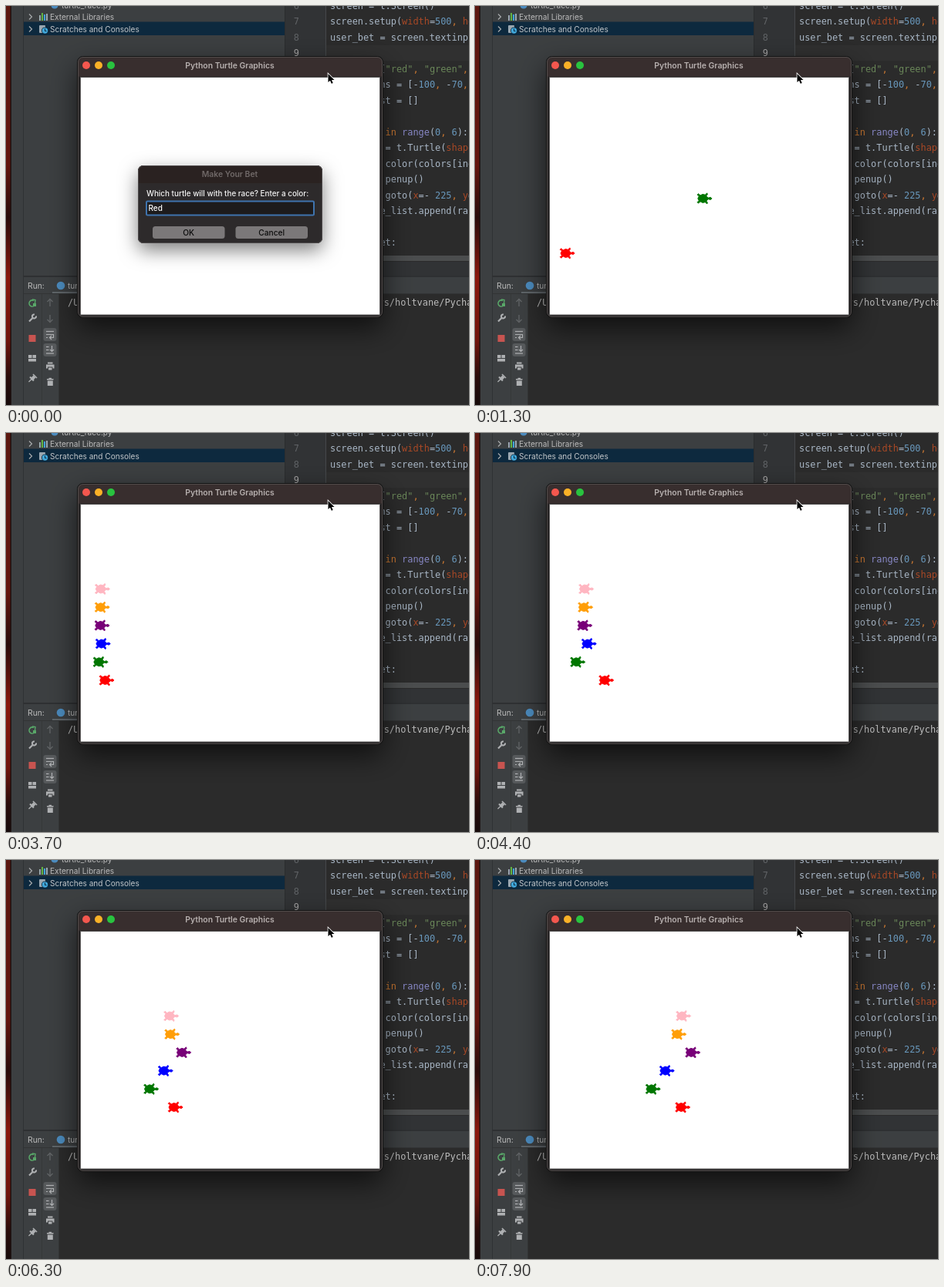
Write an HTML page with a canvas that moves like this. It is 600 px wide and 518 px high and loops after 8 s.

```html
<!DOCTYPE html>
<html lang="en">
<head>
<meta charset="utf-8">
<title>Turtle race</title>
<style>
  html, body { margin: 0; width: 100%; height: 100%; overflow: hidden; background: #2b2b2b; }
  canvas { display: block; width: 600px; height: 518px; }
</style>
</head>
<body>
<canvas id="stage"></canvas>
<script>
const W = 600, H = 518, LOOP = 8000, STEP = 100;
const canvas = document.getElementById('stage');
const ctx = canvas.getContext('2d');
const dpr = window.devicePixelRatio || 1;
canvas.width = W * dpr;
canvas.height = H * dpr;
ctx.scale(dpr, dpr);

const UI = 'Inter, "Liberation Sans", sans-serif';
const MONO = '11.9px "DejaVu Sans Mono", monospace';
const CHAR = 7.16;

function rect(x, y, w, h, color) {
  ctx.fillStyle = color;
  ctx.fillRect(x, y, w, h);
}

function round(x, y, w, h, r, color) {
  ctx.fillStyle = color;
  ctx.beginPath();
  ctx.roundRect(x, y, w, h, r);
  ctx.fill();
}

function outline(x, y, w, h, r, color, width = 1) {
  ctx.strokeStyle = color;
  ctx.lineWidth = width;
  ctx.beginPath();
  ctx.roundRect(x, y, w, h, r);
  ctx.stroke();
}

function disc(x, y, r, color) {
  ctx.fillStyle = color;
  ctx.beginPath();
  ctx.arc(x, y, r, 0, Math.PI * 2);
  ctx.fill();
}

function line(color, width, ...pts) {
  ctx.strokeStyle = color;
  ctx.lineWidth = width;
  ctx.beginPath();
  for (let i = 0; i < pts.length; i += 2) ctx.lineTo(pts[i], pts[i + 1]);
  ctx.stroke();
}

function text(str, x, y, color, font, align = 'left') {
  ctx.font = font;
  ctx.fillStyle = color;
  ctx.textAlign = align;
  ctx.fillText(str, x, y);
}

const ui = (size, weight = 400) => `${weight} ${size}px ${UI}`;

function withShadow(blur, dy, alpha, draw) {
  ctx.save();
  ctx.shadowColor = `rgba(0,0,0,${alpha})`;
  ctx.shadowBlur = blur * dpr;
  ctx.shadowOffsetY = dy * dpr;
  draw();
  ctx.restore();
}

// Code colours: d default, k keyword, s string, n number, a argument, b builtin
const INK = { d: '#a9b7c6', k: '#cc7832', s: '#6a8759', n: '#6897bb', a: '#aa4926', b: '#8888c6' };
const CODE = {
  6: ['d', 'screen = t.Screen()'],
  7: ['d', 'screen.setup(', 'a', 'width', 'd', '=', 'n', '500', 'k', ', ', 'a', 'height'],
  8: ['d', 'user_bet = screen.textinput'],
  10: ['d', 'colors = [', 's', '"red"', 'k', ', ', 's', '"green"', 'k', ','],
  11: ['d', 'y_positions = [-', 'n', '100', 'k', ', ', 'd', '-', 'n', '70', 'k', ','],
  12: ['d', 'turtle_list = []'],
  14: ['k', 'for ', 'd', 'index ', 'k', 'in ', 'b', 'range', 'd', '(', 'n', '0', 'k', ', ', 'n', '6', 'd', '):'],
  15: ['d', '    racer = t.Turtle(', 'a', 'shape', 'd', '='],
  16: ['d', '    racer.color(colors[index'],
  17: ['d', '    racer.penup()'],
  18: ['d', '    racer.goto(', 'a', 'x', 'd', '=- ', 'n', '225', 'k', ', ', 'a', 'y', 'd', '='],
  19: ['d', '    turtle_list.append(racer'],
  21: ['k', 'if ', 'd', 'user_bet:']
};

function editor() {
  rect(361, 0, 239, 351, '#2b2b2b');
  rect(361, 0, 54, 332, '#313335');
  rect(361, 0, 1, 351, '#2b2d2e');
  rect(414, 0, 1, 332, '#45484a');
  rect(415, 51, 185, 20, '#303030');
  for (const n in CODE) {
    let x = 420;
    const parts = CODE[n];
    for (let i = 0; i < parts.length; i += 2) {
      text(parts[i + 1], x, 24 + (n - 7) * 20.5, INK[parts[i]], MONO);
      x += parts[i + 1].length * CHAR;
    }
  }
  for (let n = 6; n < 10; n++) {
    text(n, 380, 24 + (n - 7) * 20.5, n === 9 ? '#a4a3a3' : '#606366', MONO, 'right');
  }
  rect(415, 324, 185, 7, '#4b4d4e');
  rect(361, 332, 239, 19, '#313335');
}

function projectTree() {
  rect(7, 0, 354, 518, '#3c3f41');
  rect(22, 0, 1, 518, '#2f3133');
  rect(23, 20.5, 338, 17.5, '#0d293e');
  const font = ui(10.1);
  text('turtle_race.py', 72, 3, '#bbbbbb', font);
  disc(63, -1, 4.5, '#4b8bbe');
  text('External Libraries', 57, 18, '#bbbbbb', font);
  text('Scratches and Consoles', 57, 34, '#c2c6c9', font);
  for (const y of [14, 30]) line('#a8abad', 1.2, 30, y - 3.5, 33.5, y, 30, y + 3.5);
  rect(43, 12, 2, 7, '#9aa7b0');
  rect(46, 9, 2, 10, '#62b543');
  rect(49, 11, 2, 8, '#40a6d8');
  rect(52, 10, 2, 9, '#9aa7b0');
  round(43, 25, 8, 10, 1, '#9aa7b0');
  disc(50.5, 32, 4.5, '#0d293e');
  disc(50.5, 32, 3.7, '#40a6d8');
  line('#0d293e', 1, 50.5, 29.5, 50.5, 32.5, 52.5, 32.5);
}

function wallpaper() {
  const g = ctx.createLinearGradient(0, 0, 0, H);
  g.addColorStop(0, '#5c170f');
  g.addColorStop(0.4, '#64150d');
  g.addColorStop(0.53, '#2a0c0a');
  g.addColorStop(0.68, '#8a180c');
  g.addColorStop(0.84, '#70140b');
  g.addColorStop(0.93, '#2a0c0a');
  g.addColorStop(1, '#160a0a');
  rect(0, 0, 7, H, g);
  rect(5.5, 0, 1.5, H, '#1d1312');
}

function toolIcons() {
  const c = '#afb1b3', dim = '#626567';
  // rerun
  ctx.strokeStyle = '#59a869';
  ctx.lineWidth = 1.5;
  ctx.beginPath();
  ctx.arc(34, 386, 4, 0.6, 5.2);
  ctx.stroke();
  line('#59a869', 1.4, 34, 381, 38, 381.5, 37.5, 386);
  rect(35, 386, 4, 4, '#59a869');
  // wrench
  line(c, 2.2, 30, 409.5, 35, 404.5);
  ctx.strokeStyle = c;
  ctx.lineWidth = 2;
  ctx.beginPath();
  ctx.arc(36.5, 403, 2.5, -0.2, 4.9);
  ctx.stroke();
  rect(29.5, 427, 9, 9, '#c75450');
  // layout
  rect(29, 453, 4.5, 4, c);
  rect(34.5, 453, 4.5, 4, c);
  rect(29, 458, 10, 3.5, c);
  // pin
  line(c, 1.2, 29.5, 488, 33, 484.5);
  line(c, 2, 31, 481.5, 36, 486.5);
  line(c, 4, 33, 485, 37, 481);
  line(c, 1.6, 35, 478, 40, 483);
  // arrows
  line(dim, 1.3, 57, 390, 57, 380.5);
  line(dim, 1.3, 53.5, 384, 57, 380.5, 60.5, 384);
  line(dim, 1.3, 57, 401, 57, 410.5);
  line(dim, 1.3, 53.5, 407, 57, 410.5, 60.5, 407);
  // soft wrap and scroll to end
  round(48.5, 418, 17, 17, 3, '#56595b');
  round(48.5, 438, 17, 17, 3, '#56595b');
  line(c, 1.2, 52, 422.5, 62, 422.5);
  line(c, 1.2, 52, 426.5, 61.5, 426.5, 61.5, 430.5, 57, 430.5);
  line(c, 1.2, 59, 428, 56.5, 430.5, 59, 433);
  line(c, 1.2, 52, 430.5, 54, 430.5);
  line(c, 1.2, 52, 451, 62, 451);
  line(c, 1.2, 52, 442.5, 55.5, 442.5);
  line(c, 1.2, 52, 446.5, 55.5, 446.5);
  line(c, 1.2, 59.5, 441, 59.5, 448);
  line(c, 1.2, 57, 446, 59.5, 448.5, 62, 446);
  // printer
  rect(54, 462.5, 6.5, 2, c);
  rect(52, 465.5, 10.5, 5, c);
  rect(54, 468.5, 6.5, 4.5, '#3c3f41');
  rect(55, 469.5, 4.5, 3, c);
  // trash
  rect(53, 484, 8.5, 1.5, c);
  rect(55.5, 482.8, 3.5, 1.5, c);
  rect(53.8, 486.5, 7, 6.5, c);
}

function runPanel() {
  rect(23, 350, 577, 2, '#2e3032');
  rect(23, 352, 577, 22, '#3c3f41');
  rect(23, 373, 577, 1, '#323435');
  rect(60, 371, 60, 2, '#5f6569');
  rect(69, 374, 531, 144, '#2b2b2b');
  rect(46, 374, 1, 144, '#353839');
  rect(68, 374, 1, 144, '#323435');
  text('Run:', 28, 367, '#bbbbbb', ui(10.3));
  disc(71, 363, 5.3, '#4b8bbe');
  text('turtle_race', 80, 367, '#bbbbbb', ui(10.2));
  text('/U', 80, 388.5, '#bbbbbb', MONO);
  text('rs/holtvane/Pycharm', 482.5, 388.5, '#bbbbbb', MONO);
  toolIcons();
}

function turtleWindow() {
  withShadow(36, 14, 0.65, () => round(93, 66, 395, 338, 7, '#242223'));
  round(93, 66, 395, 338, 7, '#242223');
  round(93.5, 66.5, 394, 25, [6, 6, 0, 0], '#382e2e');
  outline(92.5, 65.5, 396, 339, 7, '#131313');
  outline(93.5, 66.5, 394, 337, 6.5, '#5c5655', 0.8);
  ['#f4574e', '#fbb127', '#29c33f'].forEach((c, i) => disc(104 + i * 16, 77, 5, c));
  text('Python Turtle Graphics', 290, 81, '#b7b0af', ui(10.4, 600), 'center');
  rect(96, 92, 389, 309.5, '#5a5858');
  rect(97, 93, 387, 307.5, '#ffffff');
}

function dialog() {
  withShadow(24, 9, 0.5, () => round(171, 207, 239, 101, 7, '#2d2a2b'));
  round(171, 207, 239, 101, 7, '#2d2a2b');
  round(171, 207, 239, 23, [7, 7, 0, 0], '#2a2221');
  outline(171.5, 207.5, 238, 100, 6.5, '#565253', 0.8);
  text('Make Your Bet', 290, 222, '#706968', ui(10.4, 600), 'center');
  text('Which turtle will with the race? Enter a color:', 182, 247, '#f4f4f4', ui(9.9, 500));
  rect(183, 254, 215, 17, '#1d1b1c');
  outline(182, 253.5, 217, 18, 1.5, '#3f73ad', 2);
  text('Red', 184.5, 266, '#ffffff', ui(10, 500));
  for (const [label, x] of [['OK', 190], ['Cancel', 297.5]]) {
    round(x, 286, 93.5, 16, 3.5, '#7b7879');
    text(label, x + 46.7, 297.5, '#0c0c0c', ui(10.2, 500), 'center');
  }
}

function pointer() {
  ctx.beginPath();
  [0, 0, 0, 11, 2.5, 8.7, 4.3, 12.8, 6.2, 12, 4.5, 8, 8, 8]
    .forEach((v, i, a) => i % 2 || ctx.lineTo(417.5 + v, 88 + a[i + 1]));
  ctx.closePath();
  ctx.fillStyle = '#000000';
  ctx.strokeStyle = '#ffffff';
  ctx.lineWidth = 1.6;
  ctx.stroke();
  ctx.fill();
}

// Half of the turtle outline, nose to tail, as [along, across]
const HALF = [[16, 0], [14, 2], [10, 1], [7, 4], [9, 7], [8, 9], [5, 6], [1, 7],
  [-3, 5], [-6, 8], [-8, 6], [-5, 4], [-7, 0]];
const SHAPE = HALF.concat(HALF.slice(1, -1).reverse().map(([a, b]) => [a, -b]));
const SCALE = 0.79, HOME_X = 294.3, HOME_Y = 249.9, LINE_X = 116.5;
const laneY = i => 321 - 23.7 * i;

function turtle(x, y, color) {
  ctx.beginPath();
  for (const [a, b] of SHAPE) ctx.lineTo(x + a * SCALE, y + b * SCALE);
  ctx.closePath();
  ctx.fillStyle = ctx.strokeStyle = color;
  ctx.lineWidth = 0.9;
  ctx.fill();
  ctx.stroke();
}

// The turtle module redraws once per TICK; a walk is split into equal hops.
const SETUP = 790, TICK = 20, IDLE = 3, HOP = 3 * 1.1 ** 3 * 3;
const RACE = [4400, 5600, 6300, 7200, 7900];
const RACERS = [
  ['#ff0000', 167, 204, 216.5, 244, 266],
  ['#007600', 130, 167.5, 185, 202, 227.5],
  ['#0000ff', 144.5, 181, 203.5, 227, 245.5],
  ['#780078', 139, 186.5, 227, 256, 279],
  ['#ff9e08', 140, 186, 212, 239.5, 261],
  ['#ffb6c1', 141, 184, 211, 242.5, 267]
];

// Each turtle appears, pauses, then hops to its lane before the next appears.
let clock = SETUP;
const walks = RACERS.map((_, i) => {
  const start = clock;
  const dist = Math.hypot(HOME_X - LINE_X, laneY(i) - HOME_Y) / SCALE;
  const hops = 1 + Math.floor(dist / HOP);
  clock += (IDLE + hops) * TICK;
  return { start, hops };
});
const raceStart = clock;

function raceX(marks, t) {
  let t0 = raceStart, x0 = LINE_X;
  for (let i = 0; i < RACE.length; i++) {
    if (t <= RACE[i]) return x0 + (marks[i] - x0) * (t - t0) / (RACE[i] - t0);
    t0 = RACE[i];
    x0 = marks[i];
  }
  return x0;
}

function turtles(t) {
  RACERS.forEach(([color, ...marks], i) => {
    const { start, hops } = walks[i];
    if (t < start) return;
    if (t >= raceStart) return turtle(raceX(marks, t), laneY(i), color);
    const hop = Math.floor((t - start) / TICK) - IDLE + 1;
    const p = Math.min(1, Math.max(0, hop / hops));
    turtle(HOME_X + (LINE_X - HOME_X) * p, HOME_Y + (laneY(i) - HOME_Y) * p, color);
  });
}

function draw(t) {
  projectTree();
  wallpaper();
  editor();
  runPanel();
  turtleWindow();
  if (t < SETUP) dialog();
  turtles(t);
  pointer();
}

let origin = null, shown = -1;
function tick(now) {
  if (origin === null) origin = now;
  const t = Math.floor(((now - origin) % LOOP) / STEP) * STEP;
  if (t !== shown) draw(shown = t);
  requestAnimationFrame(tick);
}
draw(0);
requestAnimationFrame(tick);
</script>
</body>
</html>
```
